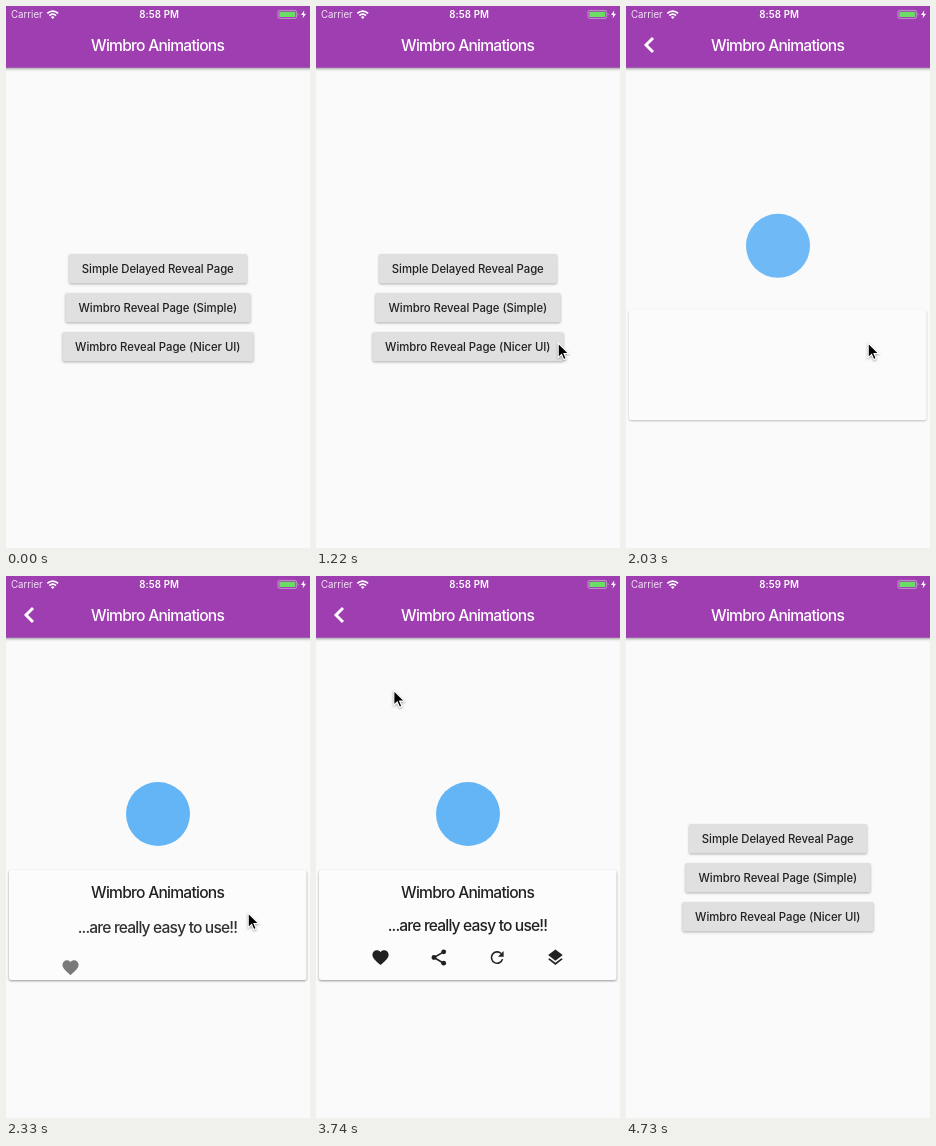
An HTML page for the animation above (6230 ms loop, 304 by 542 pixels).

```html
<!DOCTYPE html>
<html lang="en">
<head>
<meta charset="utf-8">
<title>Wimbro Animations</title>
<style>
  html, body { margin: 0; width: 100%; height: 100%; overflow: hidden; background: #fafafa; }
  svg { display: block; width: 100%; height: 100%; }
  text { font-family: Inter, Roboto, sans-serif; }
  .mid { text-anchor: middle; }
  .title { font-size: 15.6px; font-weight: 500; letter-spacing: -.75px; }
  .sub { letter-spacing: -.83px; }
  .label { font-size: 11.35px; font-weight: 500; letter-spacing: -.05px; fill: #212121; }
  .status { font-size: 9.7px; fill: #fff; }
  .bar { fill: #9f3eb1; filter: drop-shadow(0 1.6px 1.7px rgba(0, 0, 0, .42)); }
  .btn { fill: #e0e0e0; filter: drop-shadow(0 1.3px 1px rgba(0, 0, 0, .3)); }
  .card { fill: #fcfcfc; filter: drop-shadow(0 1.2px 1.3px rgba(0, 0, 0, .4)); }
  .ink { fill: #212121; }
  .line { fill: none; stroke: #212121; stroke-width: 2; }
  #cursor { filter: drop-shadow(0 1px 1px rgba(0, 0, 0, .35)); }
</style>
</head>
<body>
<svg viewBox="0 0 304 542" preserveAspectRatio="none">
  <defs>
    <linearGradient id="edge">
      <stop offset="0" stop-color="#000" stop-opacity="0"/>
      <stop offset=".5" stop-color="#000" stop-opacity=".07"/>
      <stop offset="1" stop-color="#000" stop-opacity=".3"/>
    </linearGradient>
    <clipPath id="pageClip"><rect width="304" height="542"/></clipPath>
  </defs>

  <rect width="304" height="542" fill="#fafafa"/>

  <g id="home">
    <rect class="bar" x="-10" y="-10" width="330" height="71.7"/>
    <text class="title mid" x="151.6" y="44.8" fill="#fff">Wimbro Animations</text>
    <g id="buttons"></g>
  </g>

  <g id="page">
    <rect x="-15" width="15" height="542" fill="url(#edge)"/>
    <g clip-path="url(#pageClip)">
      <rect width="304" height="542" fill="#fafafa"/>
      <circle class="reveal" cx="152" cy="238" r="32" fill="#64b5f6"/>
      <rect class="card reveal" x="3" y="294" width="297.5" height="110" rx="2.5"/>
      <text class="title mid ink reveal" x="151.6" y="322.3">Wimbro Animations</text>
      <text class="title sub mid ink reveal" x="151.4" y="355">...are really easy to use!!</text>
      <g class="reveal"><g class="icon">
        <path class="ink" d="M12 21.3L10.5 20C5.4 15.4 2 12.3 2 8.5A5.5 5.5 0 0 1 7.5 3C9.2 3 10.9 3.8 12 5.1 13.1 3.8 14.8 3 16.5 3A5.5 5.5 0 0 1 22 8.5C22 12.3 18.6 15.4 13.5 20Z"/>
      </g></g>
      <g class="reveal"><g class="icon">
        <path class="line" d="M18 5L6 12L18 19"/>
        <g class="ink"><circle cx="18" cy="5" r="3"/><circle cx="6" cy="12" r="3"/><circle cx="18" cy="19" r="3"/></g>
      </g></g>
      <g class="reveal"><g class="icon">
        <path class="line" d="M18.7 14A7 7 0 1 1 16.95 7.05"/>
        <path class="ink" d="M20 4V11H13Z"/>
      </g></g>
      <g class="reveal"><g class="icon">
        <path class="ink" d="M12 18.5L4.6 12.8 3 14.1l9 7 9-7-1.6-1.3ZM12 16L21 9 12 2 3 9Z"/>
      </g></g>
      <rect class="bar" x="-10" y="-10" width="330" height="71.7"/>
      <circle id="ripple" cx="23" cy="39" r="28" fill="#fff"/>
      <path d="M27 32L20 39L27 46" fill="none" stroke="#fff" stroke-width="2.9"/>
      <text class="title mid" x="151.6" y="44.8" fill="#fff">Wimbro Animations</text>
    </g>
  </g>

  <g id="statusBar">
    <text class="status" x="5" y="12" opacity=".85">Carrier</text>
    <g fill="none" stroke="#fff" stroke-width="1.7">
      <path d="M41.3 7.4A7.6 7.6 0 0 1 52.1 7.4"/>
      <path d="M43.4 9.6A4.6 4.6 0 0 1 50 9.6"/>
    </g>
    <path d="M46.7 13L44.9 11.1A2.6 2.6 0 0 1 48.5 11.1Z" fill="#fff"/>
    <text id="clock" class="status mid" x="153.2" y="12" font-weight="600" letter-spacing=".1">8:58 PM</text>
    <rect x="272" y="4.4" width="18.6" height="8" rx="1.6" fill="none" stroke="#fff" stroke-opacity=".5" stroke-width=".8"/>
    <rect x="273.3" y="5.7" width="16" height="5.4" rx=".6" fill="#6bdc66"/>
    <path d="M291.7 7.1a1.5 1.5 0 0 1 0 2.7Z" fill="#fff" opacity=".5"/>
    <path d="M298.3 4.3L295 9h2.2L296.6 12.5L300 7.7H297.8Z" fill="#fff"/>
  </g>

  <path id="cursor" d="M0 0V14.6L3.4 11.4 5.6 16.6 8 15.6 5.8 10.5H10.6Z" stroke="#fff" stroke-width="1.1"/>
</svg>

<script>
const LOOP = 6230, STEP = 60, WIDTH = 304, CLOSED = 4730;
const $ = id => document.getElementById(id);

// the picture only changes inside these spans, once per STEP
const bursts = [
  [120, 530], [830, 1220], [1790, 2380], [2440, 2800],
  [3280, 3860], [3920, 3980], [4400, CLOSED]
];

const buttons = [
  ["Simple Delayed Reveal Page", 178],
  ["Wimbro Reveal Page (Simple)", 185],
  ["Wimbro Reveal Page (Nicer UI)", 191]
];
$("buttons").innerHTML = buttons.map(([label, w], i) => {
  const y = 248 + i * 39;
  return `<rect class="btn" x="${152 - w / 2}" y="${y}" width="${w}" height="29.3" rx="1.8"/>
    <text class="label mid" x="151.8" y="${y + 18.7}">${label}</text>`;
}).join("");

document.querySelectorAll(".icon").forEach((icon, i) =>
  icon.setAttribute("transform", `translate(${54.8 + i * 58.3} 371.8) scale(.81)`));
const reveals = [...document.querySelectorAll(".reveal")];

const part = (t, start, length) => Math.max(0, Math.min(1, (t - start) / length));
const easeOut = (p, power) => 1 - (1 - p) ** power;
const easeBoth = p => p * p * p * (p * (6 * p - 15) + 10);
const mix = (a, b, p) => a.map((v, i) => v + (b[i] - v) * p);

function snap(t) {
  const [start, end] = bursts.findLast(b => b[0] <= t) || [0, 0];
  return t >= end ? end : start + Math.floor((t - start) / STEP) * STEP;
}

function cursorAt(t) {
  let pos = mix([267, 522], [234, 379], easeOut(part(t, 120, 410), 2));
  pos = mix(pos, [242.2, 337], easeBoth(part(t, 780, 440)));
  return mix(pos, [16.3, 31.3], easeBoth(part(t, 3230, 750)));
}

function pageX(t) {
  const opened = easeOut(part(t, 1644, 380), 3);
  const closed = easeOut(part(t, 4292, CLOSED - 4292), 3);
  return WIDTH * (1 - opened + closed);
}

const move = (el, x, y) => el.setAttribute("transform", `translate(${x} ${y})`);
const show = (el, on) => el.setAttribute("visibility", on ? "visible" : "hidden");

function draw(time) {
  const t = snap(time);
  const x = pageX(t);
  move($("page"), x, 0);
  show($("page"), x < WIDTH);
  move($("home"), (x - WIDTH) / 3, 0);
  $("ripple").setAttribute("opacity", t < 4400 ? 0 : .16 * (1 - part(t, 4400, 260)));

  reveals.forEach((el, i) => {
    const shown = easeOut(part(t, 1830 + i * 100, 275), 2);
    move(el, 0, 25 * (1 - shown));
    el.setAttribute("opacity", shown);
  });

  move($("cursor"), ...cursorAt(t));
  show($("cursor"), t >= 120 && t < CLOSED);
  $("clock").textContent = t < CLOSED ? "8:58 PM" : "8:59 PM";
}

const origin = performance.now();
function tick() {
  draw((performance.now() - origin) % LOOP);
  requestAnimationFrame(tick);
}
tick();
</script>
</body>
</html>
```
